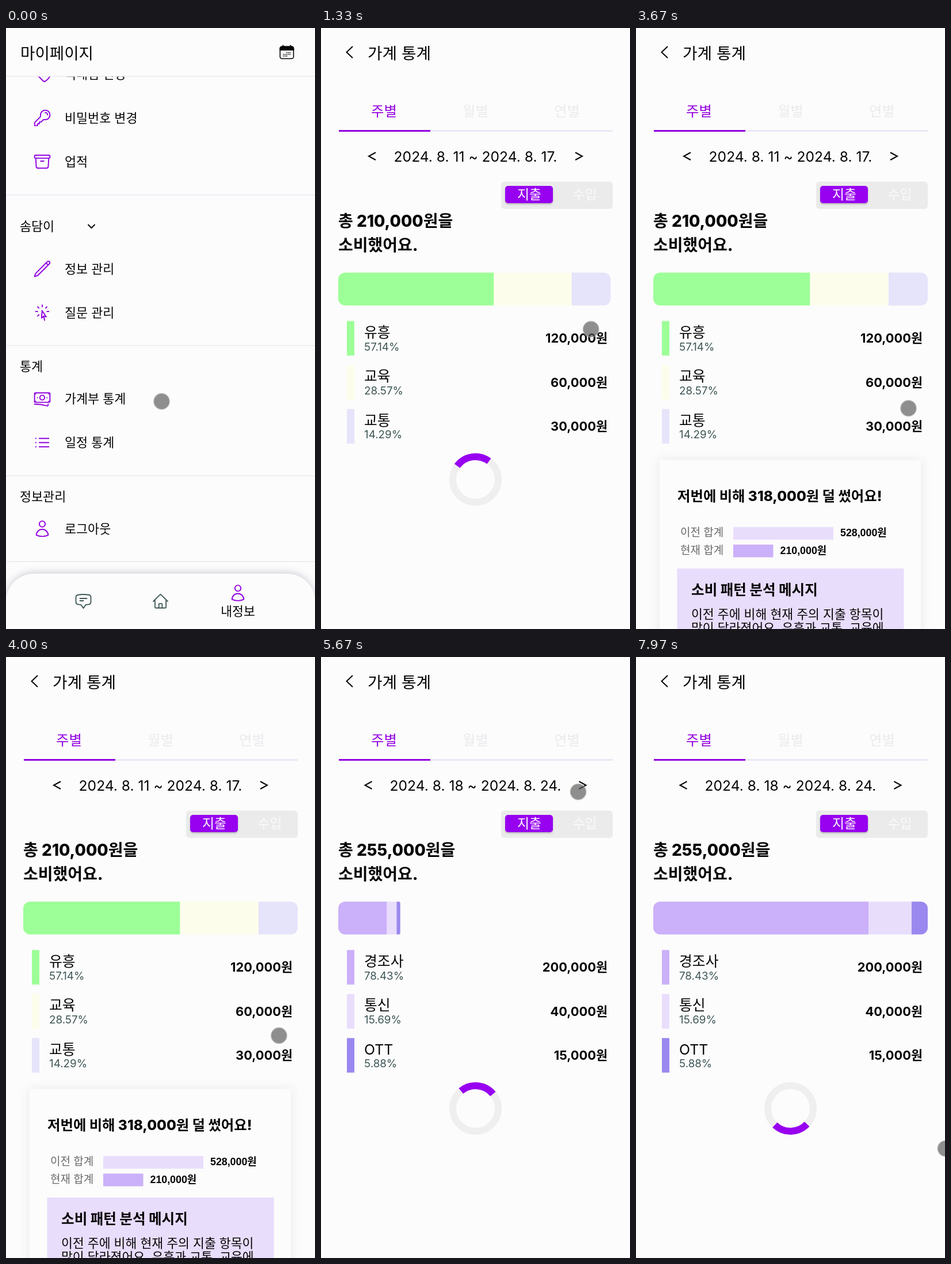
These frames come from a looping animation (537x1043 px, 8000 ms). An HTML page with a canvas:

```html
<!DOCTYPE html>
<html lang="ko">
<head>
<meta charset="utf-8">
<title>가계 통계</title>
<style>
html, body { margin: 0; width: 100%; height: 100%; overflow: hidden; background: #fcfcfc; }
canvas { display: block; width: 100%; height: 100%; }
</style>
</head>
<body>
<canvas id="stage" width="537" height="1043"></canvas>
<script>
const W = 537, H = 1043, LOOP = 8000;
const ctx = document.getElementById('stage').getContext('2d');

const BG = '#fcfcfc', INK = '#050505', SLATE = '#3f5656', PURPLE = '#9800f0', VIOLET = '#9200e0';
const LAVENDER = '#e6e4fa', MAUVE = '#cbb0fa', PALE = '#e9ddfc';
const SANS = "Inter, 'Noto Sans CJK KR', 'Noto Sans CJK', sans-serif";
const PLAIN = "'Liberation Sans', 'Noto Sans CJK KR', 'Noto Sans CJK', sans-serif";

const OPEN = 605, NEXT_WEEK = 5590, REPORT = 2900;

const WEEKS = [
  { range: '2024. 8. 11 ~ 2024. 8. 17.', total: '210,000', arrow: 179.5, start: 627,
    spin: { at: 1330, angle: -9, period: 814 },
    items: [['유흥', 57.14, '120,000', '#9dff97'], ['교육', 28.57, '60,000', '#fdfdec'], ['교통', 14.29, '30,000', LAVENDER]] },
  { range: '2024. 8. 18 ~ 2024. 8. 24.', total: '255,000', arrow: 186, start: 5609,
    spin: { at: 5670, angle: 5, period: 927 },
    items: [['경조사', 78.43, '200,000', MAUVE], ['통신', 15.69, '40,000', PALE], ['OTT', 5.88, '15,000', '#9b88ee']] }
];

const ADVICE = [
  '이전 주에 비해 현재 주의 지출 항목이',
  '많이 달라졌어요. 유흥과 교통, 교육에',
  '지출을 하고 계시네요. 지출 항목을 잘',
  '조절하면 더 알뜰한 소비가 가능할 거',
  '예요.'
];

// time, x, y
const POINTER = [
  [0, 270.5, 648], [600, 270.5, 648], [900, 325, 622], [1330, 469, 523], [1670, 508, 330],
  [2100, 507, 222], [2470, 502, 205.5], [2600, 502, 206], [3100, 482, 560], [3670, 473.5, 660],
  [4100, 475, 655], [4330, 487, 575], [4600, 496, 452], [4950, 495, 446], [5270, 476, 640],
  [5520, 447, 232], [5670, 447, 234], [5850, 515, 222], [6250, 510, 330], [6670, 514, 560],
  [7100, 532, 904], [7490, 538, 853]
];
const SCROLL = [[4160, 0], [4330, 65.5], [4600, 188], [4980, 192], [5270, 0]];

const ICON = {
  tag: 'M9.568 3H5.25A2.25 2.25 0 003 5.25v4.318c0 .597.237 1.17.659 1.591l9.581 9.581c.699.699 1.78.872 2.607.33a18.1 18.1 0 005.223-5.223c.542-.827.369-1.908-.33-2.607L11.16 3.66A2.25 2.25 0 009.568 3z',
  key: 'M15.75 5.25a3 3 0 013 3m3 0a6 6 0 01-7.029 5.912c-.563-.097-1.159.026-1.563.43L10.5 17.25H8.25v2.25H6v2.25H2.25v-2.818c0-.597.237-1.17.659-1.591l6.499-6.499c.404-.404.527-1 .43-1.563A6 6 0 1121.75 8.25z',
  box: 'M20.25 7.5l-.625 10.632a2.25 2.25 0 01-2.247 2.118H6.622a2.25 2.25 0 01-2.247-2.118L3.75 7.5M10 11.25h4M3.375 7.5h17.25c.621 0 1.125-.504 1.125-1.125v-1.5c0-.621-.504-1.125-1.125-1.125H3.375c-.621 0-1.125.504-1.125 1.125v1.5c0 .621.504 1.125 1.125 1.125z',
  pencil: 'M16.862 4.487l1.687-1.688a1.875 1.875 0 112.652 2.652L6.832 19.82a4.5 4.5 0 01-1.897 1.13l-2.685.8.8-2.685a4.5 4.5 0 011.13-1.897L16.863 4.487zm0 0L19.5 7.125',
  click: 'M15.042 21.672L13.684 16.6m0 0l-2.51 2.225.569-9.47 5.227 7.917-3.286-.672zM12 2.25V4.5m5.834.166l-1.591 1.591M20.25 10.5H18M7.757 14.743l-1.59 1.59M6 10.5H3.75m4.007-4.243l-1.59-1.59',
  cash: 'M2.25 18.75a60.07 60.07 0 0115.797 2.101c.727.198 1.453-.342 1.453-1.096V18.75M3.75 4.5v.75A.75.75 0 013 6h-.75M2.25 6v9M20.25 4.5v.75c0 .414.336.75.75.75h.75M21.75 15H21a.75.75 0 00-.75.75v.75M3.75 16.5v-.75A.75.75 0 003 15h-.75M3.375 4.5h17.25c.621 0 1.125.504 1.125 1.125v9.75c0 .621-.504 1.125-1.125 1.125H3.375a1.125 1.125 0 01-1.125-1.125V5.625c0-.621.504-1.125 1.125-1.125zM15 10.5a3 3 0 11-6 0 3 3 0 016 0zM18 10.5h.01M6 10.5h.01',
  list: 'M8.25 6.75h12M8.25 12h12M8.25 17.25h12M3.7 6.75h.4M3.7 12h.4M3.7 17.25h.4',
  user: 'M15.75 6a3.75 3.75 0 11-7.5 0 3.75 3.75 0 017.5 0zM4.501 20.118a7.5 7.5 0 0114.998 0A17.933 17.933 0 0112 21.75c-2.676 0-5.216-.584-7.499-1.632z',
  home: 'M2.25 12l8.954-8.955c.44-.439 1.152-.439 1.591 0L21.75 12M4.5 9.75v10.125c0 .621.504 1.125 1.125 1.125H9.75v-4.875c0-.621.504-1.125 1.125-1.125h2.25c.621 0 1.125.504 1.125 1.125V21h4.125c.621 0 1.125-.504 1.125-1.125V9.75M8.25 21h8.25',
  chat: 'M7.5 8.25h9m-9 3H12m-9.75 1.51c0 1.6 1.123 2.994 2.707 3.227 1.129.166 2.27.293 3.423.379.35.026.67.21.865.501L12 21l2.755-4.133a1.14 1.14 0 01.865-.501 48.172 48.172 0 003.423-.379c1.584-.233 2.707-1.626 2.707-3.228V6.741c0-1.602-1.123-2.995-2.707-3.228A48.394 48.394 0 0012 3c-2.392 0-4.744.175-7.043.513C3.373 3.746 2.25 5.14 2.25 6.741v6.018z'
};
for (const name in ICON) ICON[name] = new Path2D(ICON[name]);

// Monotone cubic interpolation of column c, held outside the key range
function track(keys, t, c) {
  const last = keys.length - 1;
  if (t <= keys[0][0]) return keys[0][c];
  if (t >= keys[last][0]) return keys[last][c];
  const i = keys.findIndex(k => k[0] > t) - 1;
  const slope = j => (keys[j + 1][c] - keys[j][c]) / (keys[j + 1][0] - keys[j][0]);
  const tangent = j => {
    if (j === 0 || j === last) return 0;
    const a = slope(j - 1), b = slope(j);
    return a * b <= 0 ? 0 : 2 * a * b / (a + b);
  };
  const d = keys[i + 1][0] - keys[i][0], u = (t - keys[i][0]) / d, v = 1 - u;
  return keys[i][c] * v * v * (1 + 2 * u) + keys[i + 1][c] * u * u * (3 - 2 * u)
    + d * u * v * (tangent(i) * v - tangent(i + 1) * u);
}

// y is the vertical middle of the glyphs
function text(s, x, y, size, { color = INK, weight = 400, align = 'left', font = SANS } = {}) {
  ctx.font = `${weight} ${size}px ${font}`;
  ctx.textAlign = align;
  ctx.fillStyle = color;
  ctx.fillText(s, x, y + size * 0.38);
}

function rect(x, y, w, h, color, radius = 0) {
  ctx.fillStyle = color;
  ctx.beginPath();
  ctx.roundRect(x, y, w, h, radius);
  ctx.fill();
}

function shadowed(color, blur, dy, draw) {
  ctx.save();
  ctx.shadowColor = color;
  ctx.shadowBlur = blur;
  ctx.shadowOffsetY = dy;
  draw();
  ctx.restore();
}

function line(points, width, color = INK) {
  ctx.strokeStyle = color;
  ctx.lineWidth = width;
  ctx.beginPath();
  points.forEach(([x, y]) => ctx.lineTo(x, y));
  ctx.stroke();
}

function arc(x, y, r, from, to, width, color) {
  ctx.strokeStyle = color;
  ctx.lineWidth = width;
  ctx.beginPath();
  ctx.arc(x, y, r, from, to);
  ctx.stroke();
}

function disc(x, y, r, color) {
  ctx.fillStyle = color;
  ctx.beginPath();
  ctx.arc(x, y, r, 0, Math.PI * 2);
  ctx.fill();
}

function icon(name, x, y, color = VIOLET, scale = 1.37) {
  ctx.save();
  ctx.translate(x, y);
  ctx.scale(scale, scale);
  ctx.translate(-12, -12);
  ctx.lineWidth = 1.4;
  ctx.lineCap = ctx.lineJoin = 'round';
  ctx.strokeStyle = color;
  ctx.stroke(ICON[name]);
  ctx.restore();
}

function below(top, draw) {
  ctx.save();
  ctx.beginPath();
  ctx.rect(0, top, W, H - top);
  ctx.clip();
  draw();
  ctx.restore();
}

const divider = y => rect(0, y - 0.5, W, 1, '#e3e2ee');

function calendar() {
  ctx.strokeStyle = INK;
  ctx.lineWidth = 1.6;
  ctx.beginPath();
  ctx.roundRect(476.3, 32.3, 23.4, 21, 3.5);
  ctx.stroke();
  rect(475.5, 31.5, 25, 7.5, INK, [4, 4, 0, 0]);
  rect(480.5, 29.5, 2, 4, INK);
  rect(493.5, 29.5, 2, 4, INK);
  for (let row = 0; row < 3; row++)
    for (let col = 0; col < 5; col++)
      if ((row > 0 || col > 1) && (row < 2 || col < 3))
        rect(481.5 + col * 2.8, 42 + row * 2.9, 1.6, 1.6, INK);
}

function menuPage() {
  text('마이페이지', 25, 43.5, 27.6);
  calendar();
  below(84, () => {
    const items = [
      ['tag', '닉네임 변경', 80], ['key', '비밀번호 변경', 156], ['box', '업적', 232],
      ['pencil', '정보 관리', 418], ['click', '질문 관리', 494], ['cash', '가계부 통계', 643.5],
      ['list', '일정 통계', 719.5], ['user', '로그아웃', 869]
    ];
    for (const [name, label, y] of items) {
      icon(name, 63, y);
      text(label, 102, y - 0.5, 21.8);
    }
  });
  text('솜담이', 24, 343.5, 21.8);
  line([[142.5, 341], [148.5, 347], [154.5, 341]], 2);
  text('통계', 24, 587, 21.8);
  text('정보관리', 24, 812.5, 21.8);
  [84, 290, 551, 777, 926].forEach(divider);

  shadowed('rgba(70,70,100,.22)', 12, -3, () => rect(0, 947, W, 130, BG, [48, 48, 0, 0]));
  icon('chat', 134.5, 995, SLATE, 1.33);
  icon('home', 268.5, 995, SLATE, 1.28);
  icon('user', 403, 980.5);
  text('내정보', 403, 1012, 21.6, { align: 'center' });
}

function shareBar(week, t) {
  const p = Math.min(1, Math.max(0, (t - week.start) / 1000));
  const full = 477 * (1 - (1 - p) ** 4);
  let x = 30;
  week.items.forEach(([, share, , color], i) => {
    const w = full * share / 100, r = Math.min(12, w / 2);
    rect(x, 424.5, w, 57, color, [[r, 0, 0, r], 0, [0, r, r, 0]][i]);
    x += w;
  });
}

function spinner({ at, angle, period }, t) {
  const mid = (angle - 90) * Math.PI / 180 + (t - at) / period * Math.PI * 2;
  arc(268.5, 783.5, 39.5, 0, Math.PI * 2, 12, '#eeefee');
  arc(268.5, 783.5, 39.5, mid - Math.PI / 4, mid + Math.PI / 4, 12, PURPLE);
}

function reportCard() {
  shadowed('rgba(60,60,70,.1)', 18, 0, () => rect(41, 749.5, 454, 440, BG));
  text('저번에 비해 318,000원 덜 썼어요!', 72, 812, 24.4, { weight: 800 });
  [['이전 합계', 174, '528,000원', PALE], ['현재 합계', 69.5, '210,000원', MAUVE]].forEach(([label, w, sum, color], i) => {
    const y = 875 + i * 30.5;
    text(label, 77, y, 19, { color: '#6a6a6a', font: PLAIN });
    rect(169, y - 9, w, 22, color);
    text(sum, 181 + w, y + 0.5, 17.8, { weight: 700, font: PLAIN });
  });
  rect(71.5, 938, 394, 210, PALE);
  text('소비 패턴 분석 메시지', 96, 974.5, 24.6, { weight: 800 });
  ADVICE.forEach((s, i) => text(s, 96, 1016.5 + i * 24, 21.6));
  disc(161, 1115.5, 11, '#3b2f1c');
  disc(161, 1115.5, 9.5, '#ffd84a');
  disc(157.5, 1113, 1.4, '#3b2f1c');
  disc(164.5, 1113, 1.4, '#3b2f1c');
  arc(161, 1116, 5, 0.3, Math.PI - 0.3, 1.5, '#3b2f1c');
}

function statsBody(week, t) {
  const center = { align: 'center' };
  text('주별', 109.5, 144, 24.4, { ...center, color: VIOLET });
  text('월별', 268.5, 144, 24.4, { ...center, color: '#ebebee' });
  text('연별', 427.5, 144, 24.4, { ...center, color: '#ebebee' });
  rect(190, 177, 317, 3, '#e9e8f4');
  rect(31, 177, 159, 3, VIOLET);

  text(week.range, 268.5, 222.5, 24.6, center);
  for (const side of [-1, 1]) {
    const x = 268.5 + side * week.arrow;
    line([[x - side * 6, 216], [x + side * 6, 222.5], [x - side * 6, 229]], 2);
  }

  rect(313, 266.5, 194, 47.5, '#ebebeb', 6);
  shadowed('rgba(0,0,0,.22)', 3, 2, () => rect(320, 274, 83, 30, PURPLE, 5));
  text('지출', 362, 288.5, 22.8, { ...center, color: '#fff' });
  text('수입', 458.5, 288.5, 22.8, { ...center, color: '#fafafa' });

  text(`총 ${week.total}원을`, 30, 334, 28, { weight: 800 });
  text('소비했어요.', 30, 376, 28, { weight: 800 });

  shareBar(week, t);
  week.items.forEach(([name, share, sum, color], i) => {
    const y = 538.5 + i * 76.4;
    rect(45, y - 30, 13, 60, color);
    text(name, 75, y - 11, 24.8);
    text(share.toFixed(2) + '%', 75, y + 14, 18.8, { color: SLATE });
    text(sum + '원', 498, y - 0.5, 21.8, { weight: 700, align: 'right' });
  });

  if (t >= REPORT && t < NEXT_WEEK) reportCard();
  else spinner(week.spin, t);
}

function statsPage(t) {
  line([[55, 32], [44.5, 42], [55, 52]], 2);
  text('가계 통계', 81, 43.5, 27.8);
  below(84, () => {
    ctx.translate(0, -track(SCROLL, t, 1));
    statsBody(WEEKS[t < NEXT_WEEK ? 0 : 1], t);
  });
}

function pointer(t) {
  const x = track(POINTER, t, 1), y = track(POINTER, t, 2);
  disc(x, y, 13.5, 'rgba(90,90,90,.68)');
  arc(x, y, 13.8, 0, Math.PI * 2, 1.2, 'rgba(180,180,172,.8)');
}

function frame() {
  const t = performance.now() % LOOP;
  rect(0, 0, W, H, BG);
  if (t < OPEN) menuPage();
  else statsPage(t);
  pointer(t);
  requestAnimationFrame(frame);
}
requestAnimationFrame(frame);
</script>
</body>
</html>
```
